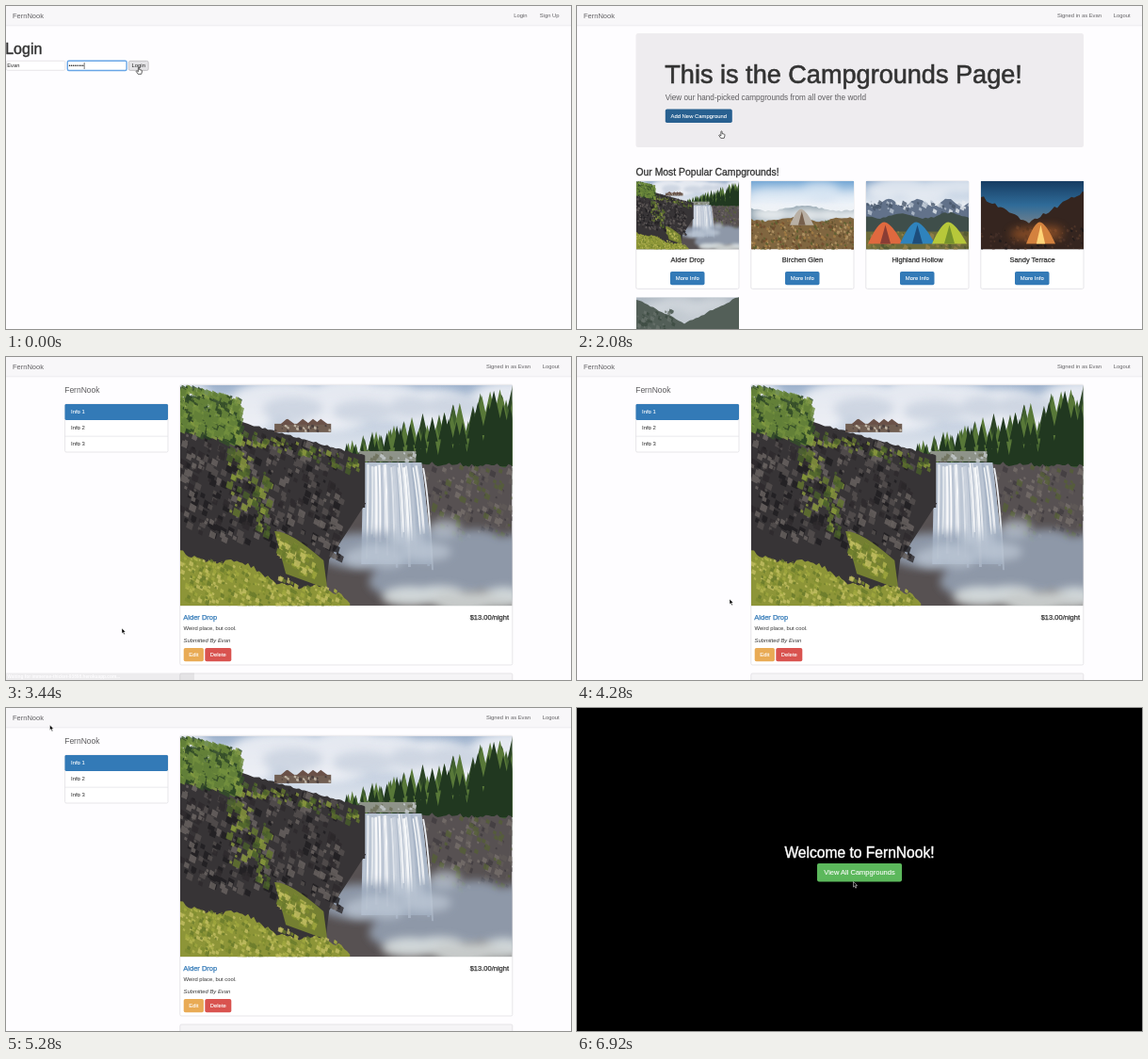
An HTML page that plays this animation: 600 px wide and 343 px high, repeating every 7000 ms.

```html
<!DOCTYPE html>
<html lang="en">
<head>
<meta charset="utf-8">
<title>Campgrounds</title>
<style>
html, body { margin: 0; height: 100%; overflow: hidden; background: #fefdff; }
svg { display: block; }
#stage { width: 100vw; height: 100vh; }
text { font-family: "Liberation Sans", Arial, sans-serif; white-space: pre; }
</style>
</head>
<body>
<svg id="stage" viewBox="0 0 600 343"></svg>
<script>
const BRAND = 'FernNook', USER = 'Evan';
const BLUE = '#337ab7', DARK_BLUE = '#286090', LINK = '#626164', LINE = '#dddce0';

let seed = 7;
const rand = () => (seed = (seed * 16807) % 2147483647) / 2147483647;
const clamp = v => Math.max(0, Math.min(1, v));

// Basic shapes; weight is a thin outline that stands for a medium face
const text = (x, y, size, str, fill = '#333', weight = 0, more = '') =>
  `<text x="${x}" y="${y}" font-size="${size}" fill="${fill}" stroke="${fill}" stroke-width="${weight}" ${more}>${str}</text>`;
const rect = (x, y, w, h, fill, more = '') =>
  `<rect x="${x}" y="${y}" width="${w}" height="${h}" fill="${fill}" ${more}/>`;
const shape = (d, fill, opacity = 1) => `<path d="${d}" fill="${fill}" opacity="${opacity}"/>`;
const box = (x, y, w, h, fill = '#fff', line = LINE, width = .7) =>
  rect(x, y, w, h, fill, `rx="1.5" stroke="${line}" stroke-width="${width}"`);
const mid = 'text-anchor="middle"', end = 'text-anchor="end"';
const button = (x, y, w, h, fill, label, size = 5.9, id = '') =>
  rect(x, y, w, h, fill, `rx="1.8" id="${id}"`) +
  text(x + w / 2, y + h / 2 + size * .35, size, label, '#fff', .1, mid);

// Scenery, grown from seeded random numbers
const many = (n, make) => Array.from({ length: n }, (_, i) => make((i + rand()) / n)).join('');
const scatter = (n, colors, make, opacity) =>
  colors.split(' ').map(c => shape(many(n, make), c, opacity)).join('');
const specks = (n, colors, x, y, w, h, size, slope = 0) => scatter(n, colors, () => {
  const dx = rand() * w, s = size * (.4 + rand());
  return `M${x + dx} ${y + rand() * h + dx * slope}l${s} ${s * .6}l${-s * .3} ${s}l${-s} ${-s * .5}z`;
}, .8);
const firs = (n, colors, x, w, ground, height) => scatter(n, colors, k => {
  const h = height(k) * (.65 + rand() * .4), r = h * .16;
  return `M${x + w * k} ${ground - h}l${r * .7} ${h * .5}h${-r * .3}l${r * .6} ${h * .5}h${-r * 2}l${r * .6} ${-h * .5}h${-r * .3}z`;
});
const ridge = (x0, x1, top, bottom, fill, rough = 2) => {
  let d = `M${x0} ${bottom}`;
  for (let x = x0; x <= x1; x += 3) d += `L${x} ${top(x) + (rand() - .5) * rough}`;
  return shape(d + `L${x1} ${top(x1)}V${bottom}z`, fill);
};
const puffs = (n, x, y, w, h, r, fill, opacity = .6) =>
  `<g filter="url(#soft)" fill="${fill}" opacity="${opacity}">` + many(n, k =>
    `<ellipse cx="${x + w * k}" cy="${y + h * rand()}" rx="${r * (.7 + rand() * .6)}" ry="${r * .45}"/>`) + '</g>';
const photo = (id, w, h, sky, body) =>
  `<symbol id="${id}" viewBox="0 0 ${w} ${h}" preserveAspectRatio="none">
  <linearGradient id="${id}Sky" x2="0" y2="1">${sky.split(' ').map((c, i) => `<stop offset="${i * .35}" stop-color="${c}"/>`).join('')}</linearGradient>
  ${rect(0, 0, w, h, `url(#${id}Sky)`)}${body}</symbol>`;
const use = (id, x, y, w, h) => `<use href="#${id}" x="${x}" y="${y}" width="${w}" height="${h}"/>`;

const PINES = '#2c4426 #41602f #587838 #213820', MOSS = '#64782f #8b9c3c #49602a';
const ROCKS = '#1f1d20 #55504f #2d2a2c #6b6462', GRASS = '#b4b650 #7d8b2f #a2a93f #c3bf63 #687a2b';

const streaks = many(30, k => `<path d="M${196 + 62 * k} ${82 + rand() * 6}q${6 * k} 30 ${12 * k - 2} ${70 + rand() * 40}"
  fill="none" stroke="hsl(215 22% ${72 + rand() * 28}%)" stroke-width="${1 + rand() * 2}"/>`);
const lodge = rect(100, 41, 60, 9, '#705e52') + specks(12, '#d3c8b8 #43393a', 100, 41, 58, 6, 2) +
  many(5, k => shape(`M${94 + 60 * k} 42l7 -6l8 6z`, '#6a5148'));

const falls = photo('falls', 352, 234, '#9fb3cd #eceff4 #eceff4',
  puffs(9, 0, 0, 352, 36, 45, '#f5f6f9', .8) + puffs(5, 70, 22, 230, 8, 26, '#bdc8d8') +
  ridge(172, 352, x => 74 - (x - 172) * .2, 115, '#395331', 6) +
  firs(22, PINES, 172, 185, 86, k => 24 + 66 * k) +
  ridge(150, 352, x => 80 + (x - 150) * .03, 234, '#575152', 5) +
  specks(45, '#423d40 #77706c #615a58 #566037', 255, 84, 97, 76, 4) +
  rect(190, 70, 60, 11, '#8e9389') + specks(12, '#6c6e58 #c9cfd2', 190, 70, 58, 8, 3) +
  shape('M194 82H256L268 190H192z', '#b4bfce') + streaks +
  puffs(12, 190, 165, 180, 60, 42, '#98a5b8', .85) + puffs(6, 185, 150, 100, 40, 22, '#c6d0dd') +
  puffs(6, 240, 222, 120, 10, 24, '#e3e9e8', .8) +
  ridge(0, 196, x => 22 + x * .27, 130, '#373436') + shape('M0 125H197L158 185L152 234H0z', '#373436') +
  specks(110, ROCKS, 0, 30, 170, 120, 5, .2) + specks(35, MOSS, 0, 26, 190, 14, 4, .27) +
  specks(26, MOSS, 50, 60, 45, 70, 5, .6) +
  specks(150, '#35502a #5c7c33 #89a044 #263f23 #6e8c3c', -4, -4, 66, 46, 5, .25) + lodge +
  shape('M100 155Q116 154 152 186L156 216L112 200z', '#747f32') + specks(18, GRASS, 102, 156, 42, 24, 4, .6) +
  ridge(0, 180, x => 174 + x * .3 + 5 * Math.sin(x / 14), 234, '#8d9538', 5) +
  specks(100, GRASS, 0, 176, 170, 48, 3, .24));

const tent = (x, w, color, door) => shape(`M${x} 67Q${x + w * .3} 42 ${x + w * .5} 44T${x + w} 67z`, color) +
  shape(`M${x + w * .35} 67L${x + w * .5} 47L${x + w * .65} 67z`, door);

const meadow = photo('meadow', 109, 73, '#76a8d5 #e9eff6',
  puffs(4, 0, 8, 109, 14, 24, '#f1f5fa') +
  ridge(0, 109, x => 29 + 3 * Math.sin(x / 12), 48, '#8296a3') + puffs(5, 0, 34, 109, 4, 18, '#f2f4f6', .9) +
  ridge(0, 109, x => 41 + 2 * Math.sin(x / 9), 73, '#806640') +
  specks(70, '#5c4c2b #a57f45 #59602f #b89a68 #704a2e', 0, 41, 109, 32, 2) +
  `<g transform="translate(20 -3) scale(.75)">${tent(28, 34, '#b9b0a5', '#77604d')}</g>`);

const peaks = photo('peaks', 109, 73, '#7f9fc4 #e8edf3',
  puffs(5, 0, 3, 109, 12, 24, '#eef1f6', .8) +
  ridge(0, 109, x => 23 + 4 * Math.sin(x / 5), 50, '#62728a') +
  specks(20, '#e7ebf1 #b8c3d1 #46566a', 0, 20, 109, 12, 3) +
  ridge(0, 109, x => 37 + 3 * Math.sin(x / 8), 73, '#3f4e4a') +
  rect(0, 54, 109, 19, '#6d6b3b') + specks(25, '#81783c #4f5731 #96834b', 0, 53, 109, 18, 3) +
  ['#df693f #8a3d34', '#2f83bd #1d4d7b', '#b7c83a #76922c'].map((c, i) => tent(2 + i * 34, 37, ...c.split(' '))).join(''));

const dusk = photo('dusk', 109, 73, '#173c62 #2f6b98 #81868c',
  ridge(0, 109, x => 44 - Math.abs(x - 50) * .55, 73, '#35251f', 4) +
  specks(35, '#46312a #1b1819 #54392a', 0, 46, 109, 26, 2) + puffs(3, 50, 54, 28, 4, 16, '#b9652a') +
  tent(48, 31, '#d4823e', '#ffd579'));

const valley = photo('valley', 109, 73, '#aeb8c2 #c5ccd3',
  puffs(4, 15, 5, 70, 8, 18, '#dfe3e7') +
  ridge(0, 109, x => 28 - Math.abs(x - 52) * .5, 73, '#535f58') + specks(35, '#3b4a40 #68726c', 0, 12, 40, 40, 3));

// Pages
const nav = (...links) => rect(0, 0, 600, 21, '#f8f7f9') + rect(0, 20.6, 600, .6, '#e3e2e5') +
  text(7, 12.9, 7.5, BRAND, LINK) + links.map(([x, str]) => text(x, 12.3, 5.85, str, LINK, 0, end)).join('');
const signedIn = nav([557, 'Signed in as ' + USER], [587.5, 'Logout']);

const login = nav([553.5, 'Login'], [587.5, 'Sign Up']) + text(-.8, 51.3, 16, 'Login', '#333', .4) +
  box(.3, 58.3, 62.5, 10) + text(1.2, 65.4, 5.8, USER, '#222') +
  box(65.3, 58.3, 62.8, 10.2, '#fff', '#69a6e6', 1.4) + text(66.5, 65.4, 5.8, '••••••••', '#222') +
  rect(82.8, 60, .6, 7, '#222') +
  box(130.4, 58.4, 20.8, 10, '#e4e3e6', '#b3b2b5') + text(133.6, 65.4, 5.85, 'Login', '#222');

const places = { falls: 'Alder Drop', meadow: 'Birchen Glen', peaks: 'Highland Hollow', dusk: 'Sandy Terrace' };
const card = ([id, name], i) => {
  const x = 63 + i * 122;
  return box(x - .2, 185.8, 109.2, 114.6) + use(id, x, 186, 109, 72.4) +
    text(x + 54.5, 272.4, 7.5, name, '#333', .25, mid) +
    button(x + 36, 282, 36.5, 14.3, BLUE, 'More Info', 5.9, id + 'Info');
};
const list = signedIn + rect(62.5, 29, 475.5, 121, '#eeecef', 'rx="2.5"') +
  text(93.3, 81.5, 27.1, 'This is the Campgrounds Page!', '#333', .6) +
  text(93.7, 100, 8.2, 'View our hand-picked campgrounds from all over the world', '#5c5b5e') +
  button(93.8, 109.6, 71, 14.4, BLUE, 'Add New Campground', 5.9, 'add') +
  text(62.5, 179.6, 10.36, 'Our Most Popular Campgrounds!', '#333', .3) +
  Object.entries(places).map(card).join('') + use('valley', 63, 309.3, 109, 72.4);

const detail = signedIn + text(62.2, 38.4, 8.5, BRAND, '#5c5b5e') +
  box(62.6, 50, 109.4, 51) + rect(62.5, 50, 109.5, 17, BLUE, 'rx="1.4"') + rect(62.6, 83.8, 109.4, .6, LINE) +
  [1, 2, 3].map(i => text(69, 43.4 + i * 17, 5.9, 'Info ' + i, i > 1 ? '#444' : '#fff', .08)).join('') +
  box(184.8, 29.3, 353, 297.7) + use('falls', 185, 29.8, 352.5, 234.4) +
  text(188.3, 278.5, 7.5, places.falls, BLUE, .25) + text(534, 278.5, 7.5, '$13.00/night', '#333', .25, end) +
  text(188.5, 290.2, 5.85, 'Weird place, but cool.') +
  text(188.5, 302.8, 5.85, 'Submitted By ' + USER, '#333', 0, 'font-style="italic"') +
  button(188.7, 309, 21.2, 14.2, '#e9ab55', 'Edit') + button(211.3, 309, 28, 14.2, '#d9534f', 'Delete') +
  box(184.8, 336, 353, 20, '#f5f4f6');

const welcome = rect(0, 0, 600, 343, '#000') + text(300, 158.6, 15.6, `Welcome to ${BRAND}!`, '#fff', .4, mid) +
  button(255, 165, 90, 19.4, '#5cb85c', 'View All Campgrounds', 7.5);

const pages = { login, list, detail, welcome };
const el = id => document.getElementById(id);
el('stage').innerHTML = '<filter id="soft" x="-.5" y="-.5" width="2" height="2"><feGaussianBlur stdDeviation="5"/></filter>' +
  falls + meadow + peaks + dusk + valley +
  Object.entries(pages).map(([id, body]) => `<g id="${id}">${body}</g>`).join('') +
  `<g id="status">${rect(0, 335.5, 200, 8, '#000')}${text(1.2, 341.2, 4.8, 'Waiting for immense-thicket-93898.herokuapp.com...', '#fff', 0, 'font-weight="bold"')}</g>
  <path id="arrow" d="M0 0V5.6L1.3 4.4L2.3 6.7L3.3 6.2L2.3 4H4Z" stroke="#fff" stroke-width=".5"/>
  <path id="hand" d="M-.6 .3Q0 -.4 .6 .3V2.6L3 3.1Q3.6 3.3 3.4 5L2.7 7.3H-.8L-2.8 4.4Q-2.6 3.4 -1.6 4.1L-.6 4.8Z" fill="#fff" stroke="#222" stroke-width=".7"/>`;

// Motion: page start times, and the pointer's stops as time, x, y
const starts = { login: 0, list: 860, detail: 3080, welcome: 6240 };
const stops = [[0, 141, 65], [1100, 141, 65], [2080, 153.5, 133], [2680, 117, 288], [3440, 123, 288],
  [4280, 162, 257], [5280, 46.5, 18], [5600, 28, 10], [6120, 165.5, 63], [6440, 262, 134], [6920, 293.5, 184.5]];

function pointer(t) {
  const i = Math.max(1, stops.findIndex(s => s[0] > t)), last = t >= 6920;
  const [t0, x0, y0] = stops[last ? stops.length - 2 : i - 1], [t1, x1, y1] = stops[last ? stops.length - 1 : i];
  const k = clamp((t - t0) / (t1 - t0)), e = k * k * (3 - 2 * k);
  return [x0 + (x1 - x0) * e, y0 + (y1 - y0) * e];
}

// The status bar shows before each page arrives and fades after it
const waiting = (t, start) => start && clamp(Math.min((t - start + 700) / 80, (start + 375 - t) / 220));

function draw(t) {
  const current = Object.keys(starts).filter(id => t >= starts[id]).pop();
  const show = (id, on) => el(id).style.display = on ? '' : 'none';
  for (const id in pages) show(id, id === current);
  el('add').setAttribute('fill', t > 1500 && t < 2160 ? DARK_BLUE : BLUE);
  el('fallsInfo').setAttribute('fill', t > 2600 ? DARK_BLUE : BLUE);
  el('status').setAttribute('opacity', Math.max(...Object.values(starts).map(s => waiting(t, s))));

  const overLink = t < starts.detail || Math.abs(t - 5600) < 160;
  for (const id of ['arrow', 'hand']) {
    el(id).setAttribute('transform', `translate(${pointer(t)})`);
    show(id, (id === 'hand') === overLink);
  }
}

const begin = performance.now();
(function tick() {
  draw((performance.now() - begin) % 7000);
  requestAnimationFrame(tick);
})();
</script>
</body>
</html>
```
